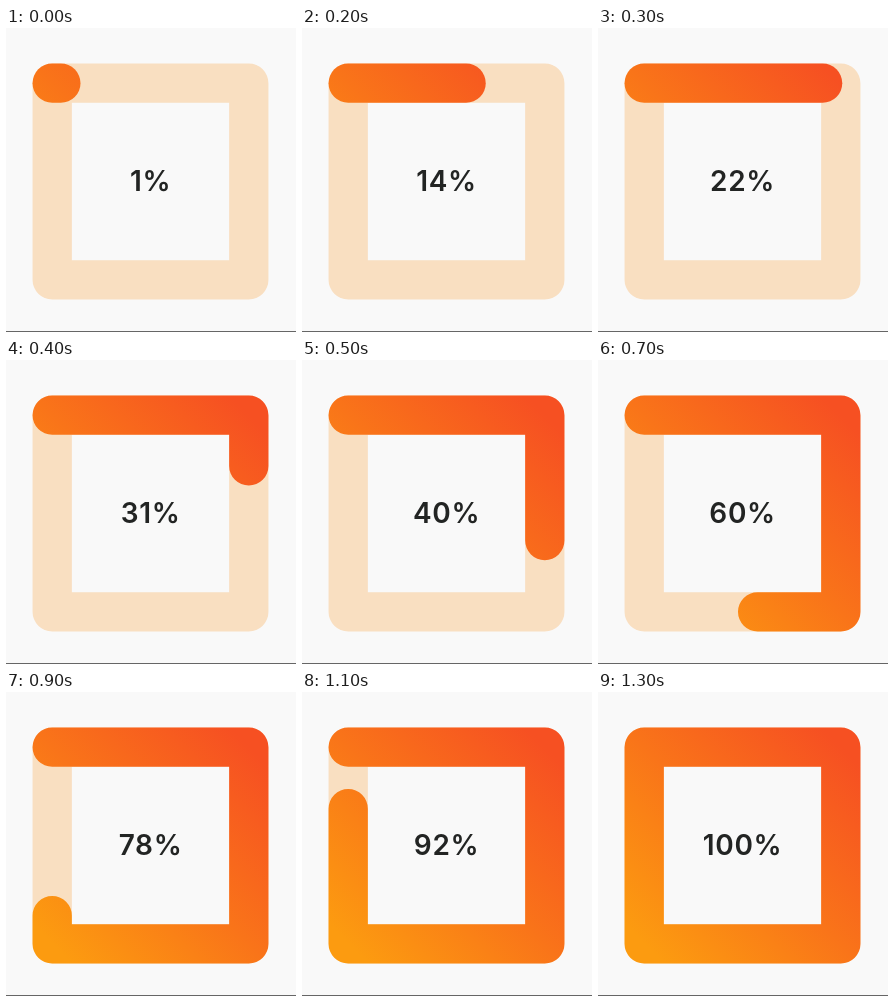
Animation, 290 px wide and 304 px high, one loop 1.8 s. Source, as an HTML page:

```html
<!DOCTYPE html>
<html lang="en">
<head>
<meta charset="utf-8">
<title>Square progress</title>
<style>
  html, body { margin: 0; width: 100%; height: 100%; overflow: hidden; background: #f9f9f9; }
  svg { display: block; width: 290px; height: 304px; }
  .ring { fill: none; stroke-width: 39.3; stroke-linejoin: round; }
  .track { stroke: #f9dfc1; }
  .bar { stroke: url(#heat); stroke-linecap: round; }
  text {
    font: 600 28px Inter, sans-serif;
    letter-spacing: .7px;
    text-anchor: middle;
    fill: #222423;
  }
</style>
</head>
<body>
<svg viewBox="0 0 290 304">
  <defs>
    <linearGradient id="heat" x1="0" y1="1" x2="1" y2="0">
      <stop offset="0" stop-color="#fc9b10"/>
      <stop offset=".5" stop-color="#f97419"/>
      <stop offset="1" stop-color="#f65022"/>
    </linearGradient>
  </defs>
  <path class="ring track" d="M46.2 55.2h196.6v196.6H46.2z"/>
  <path class="ring bar" id="bar" pathLength="100" d="M46.2 55.2h196.6v196.6H46.2z"/>
  <text id="label" x="144.6" y="162.5">1%</text>
  <rect y="303" width="290" height="1" fill="#666"/>
</svg>
<script>
  const LOOP = 1800, STEP = 100, LAST = 13;
  const bar = document.getElementById('bar');
  const label = document.getElementById('label');

  // Sine ease sampled in steps, holding at the full ring.
  function progress(step) {
    if (step === 0) return 1.1;
    if (step >= LAST) return 100;
    const angle = (22.9 + 11.33 * step) * Math.PI / 180;
    return 50 * (1 - Math.cos(angle));
  }

  function draw(now) {
    const value = progress(Math.floor(now % LOOP / STEP));
    bar.style.strokeDasharray = value < 100 ? value + ' 200' : 'none';
    label.textContent = Math.floor(value) + '%';
  }

  const start = performance.now();
  function tick() {
    draw(performance.now() - start);
    requestAnimationFrame(tick);
  }
  tick();
</script>
</body>
</html>
```
